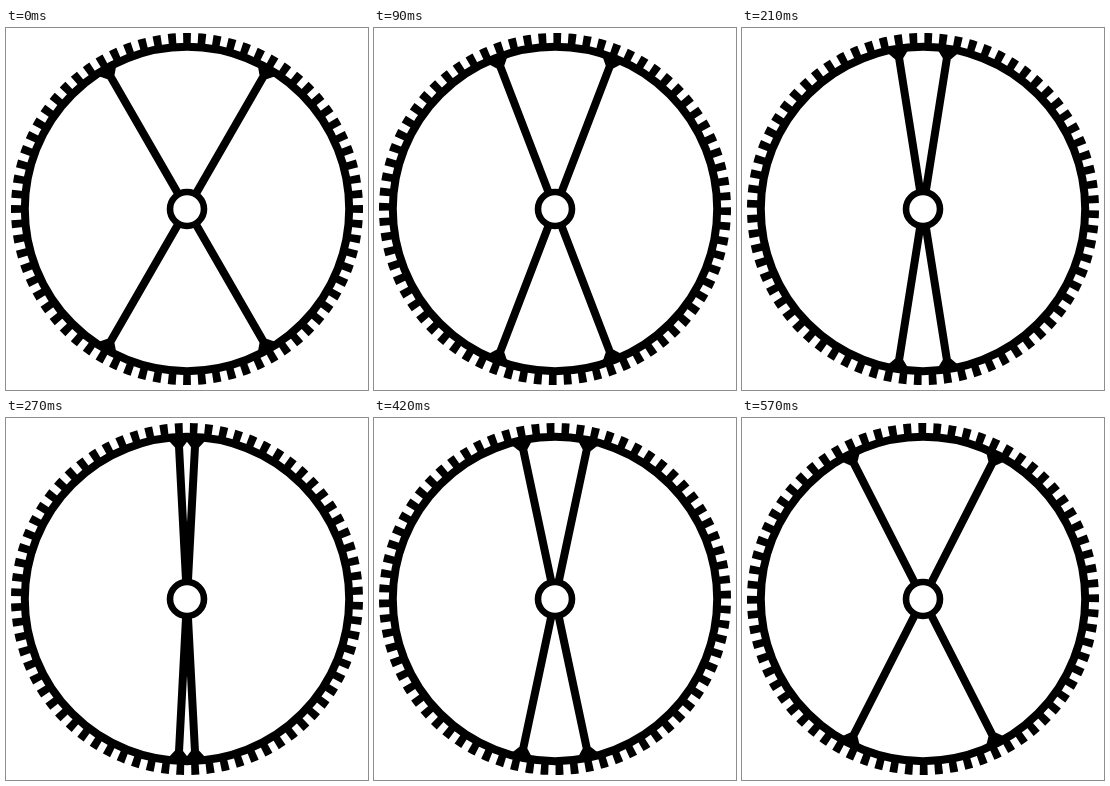
These frames come from a looping animation (362x362 px, 600 ms). An HTML page:

```html
<!DOCTYPE html>
<html lang="en">
<head>
<meta charset="utf-8">
<title>Gear wheel</title>
<style>
html, body { margin: 0; height: 100%; overflow: hidden; background: #fff; }
svg { display: block; width: 100%; height: 100%; }
</style>
</head>
<body>
<svg viewBox="-181 -181 362 362">
  <defs>
    <!-- half a spoke with its flared foot on the rim -->
    <path id="arm" d="M-4 -16V-152L-9.5 -158.5V-161H9.5V-158.5L4 -152V-16Z"/>
    <g id="bar"><use href="#arm"/><use href="#arm" transform="rotate(180)"/></g>
  </defs>
  <use id="left" href="#bar"/>
  <use id="right" href="#bar"/>
  <g fill="none" stroke="#000">
    <circle id="teeth" r="170.5" stroke-width="11" pathLength="360"
      stroke-dasharray="2.6 2.4" stroke-dashoffset="1.3"/>
    <circle r="162.2" stroke-width="8"/>
    <circle r="17" stroke-width="6.6" fill="#fff"/>
  </g>
</svg>
<script>
const STEP = 30, STEPS = 20, PITCH = 5;
const turn = (id, angle) =>
  document.getElementById(id).setAttribute('transform', `rotate(${angle})`);

function draw() {
  const step = Math.floor(performance.now() / STEP) % STEPS;
  const angle = 30 - 3 * step;
  turn('right', angle);
  turn('left', -angle);
  turn('teeth', PITCH * step / STEPS);
  requestAnimationFrame(draw);
}
draw();
</script>
</body>
</html>
```
